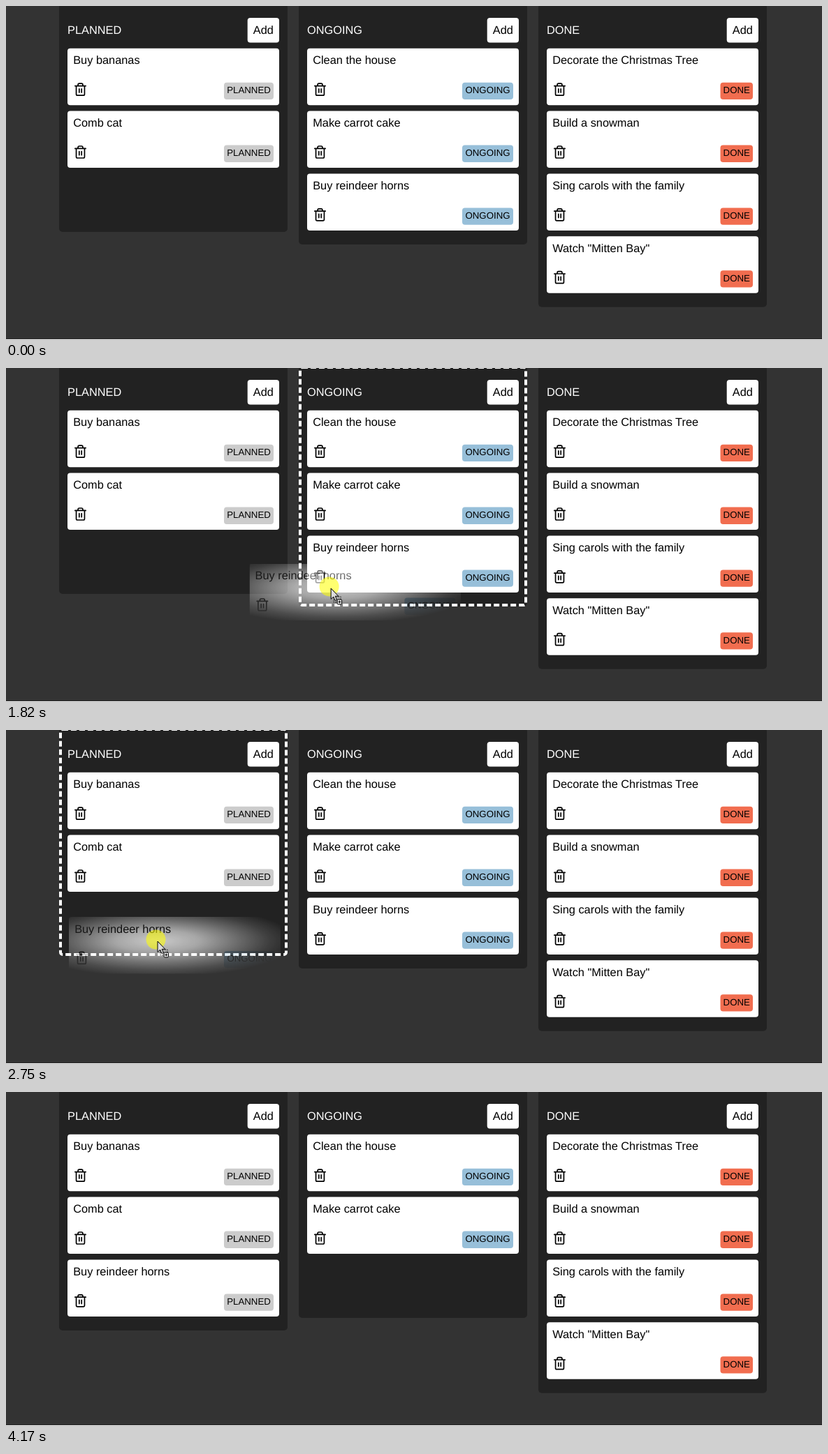
Animation of 1168x479 px, one loop 4.78 s. Source, as an HTML page:

```html
<!DOCTYPE html>
<html lang="en">
<head>
<meta charset="utf-8">
<title>Task board</title>
<style>
  html, body { margin: 0; width: 100%; height: 100%; overflow: hidden; background: #333; }
  svg { display: block; width: 100%; height: 100%; }
  text { font: 16.35px "Liberation Sans", Arial, sans-serif; text-rendering: geometricPrecision; }
  .tag { font-size: 13.28px; }
  .icon { fill: none; stroke: #000; stroke-width: 2; stroke-linecap: round; stroke-linejoin: round; }
</style>
</head>
<body>
<svg id="stage" viewBox="0 0 1168 479">
  <defs>
    <radialGradient id="fade" gradientUnits="userSpaceOnUse" cx="0" cy="0" r="1"
        gradientTransform="translate(127 34.5) scale(200 52)">
      <stop offset="0" stop-color="#fff" stop-opacity=".76"/>
      <stop offset=".3" stop-color="#fff" stop-opacity=".6"/>
      <stop offset=".6" stop-color="#fff" stop-opacity=".31"/>
      <stop offset=".8" stop-color="#fff" stop-opacity=".13"/>
      <stop offset="1" stop-color="#fff" stop-opacity="0"/>
    </radialGradient>
    <mask id="spot" maskUnits="userSpaceOnUse" x="0" y="0" width="303" height="82">
      <rect width="303" height="82" fill="url(#fade)"/>
    </mask>
    <g id="trash" class="icon">
      <path d="M3 6h18M19 6v14a2 2 0 0 1-2 2H7a2 2 0 0 1-2-2V6M8 6V4a2 2 0 0 1 2-2h4a2 2 0 0 1 2 2v2M10 11v6M14 11v6"/>
    </g>
  </defs>
  <rect width="1168" height="479" fill="#333"/>
  <g id="before"></g>
  <g id="after"></g>
  <rect y="478" width="1168" height="1" fill="#fff"/>
  <rect id="drop" y="-1" width="323" rx="3" fill="none" stroke="#fff" stroke-width="4" stroke-dasharray="8 4"/>
  <g id="ghost"><g id="ghostCard" mask="url(#spot)"></g></g>
  <g id="cursor">
    <circle id="press" cx="-2" cy="-2" r="14" fill="#ff0" fill-opacity=".56"/>
    <path id="arrow" d="M.5 .5V16L4 12.7L6.5 18L9 17L6.6 11.8H11.2Z" fill="#fff" stroke="#000"/>
    <g id="copy" fill="none" stroke="#000">
      <path d="M4.500 13.500V20.500H14.500V12.500H9" stroke-dasharray="1.500 1.500"/>
      <rect x="9.500" y="16.500" width="6.500" height="7" rx="1.500" fill="#ddd"/>
      <path d="M11 20h3.600M12.800 18.200v3.600"/>
    </g>
    <path id="move" fill="#fff" stroke="#000" stroke-linejoin="round"
      d="M0-9.500L3.500-6H1.300V-1.300H6V-3.500L9.500 0L6 3.500V1.300H1.300V6H3.500L0 9.500L-3.500 6H-1.300V1.300H-6V3.500L-9.500 0L-6-3.500V-1.300H-1.300V-6H-3.500Z"/>
  </g>
</svg>
<script>
const LOOP = 4780, GRAB = 1350, DROP = 3440;
const $ = id => document.getElementById(id);

const COLUMNS = [
  { name: 'PLANNED', x: 76, color: '#ccc', tag: 71 },
  { name: 'ONGOING', x: 419, color: '#97bfd9', tag: 73 },
  { name: 'DONE', x: 762, color: '#f16d4f', tag: 46.5 }
];
const planned = ['Buy bananas', 'Comb cat'];
const ongoing = ['Clean the house', 'Make carrot cake'];
const done = ['Decorate the Christmas Tree', 'Build a snowman',
  'Sing carols with the family', 'Watch "Mitten Bay"'];
const moving = 'Buy reindeer horns';

const rect = (x, y, w, h, r, fill) =>
  `<rect x="${x}" y="${y}" width="${w}" height="${h}" rx="${r}" fill="${fill}"/>`;
const label = (x, y, str, attrs = '') => `<text x="${x}" y="${y}" ${attrs}>${str}</text>`;

function card(title, col) {
  const left = 295 - col.tag;
  return rect(0, 0, 303, 81.5, 4, '#fff') +
    label(8.2, 22.5, title) +
    '<use href="#trash" transform="translate(8.300 48.700) scale(.85)"/>' +
    rect(left, 49, col.tag, 24.3, 4, col.color) +
    label(left + col.tag / 2, 64.4, col.name, 'class="tag" text-anchor="middle"');
}

const bottomOf = count => Math.max(324, 72.6 + 89.8 * count);

function column(col, titles) {
  const cards = titles.map((title, i) =>
    `<g transform="translate(12 ${60.8 + 89.8 * i})">${card(title, col)}</g>`);
  return `<g transform="translate(${col.x} 0)">` +
    rect(0, -3, 327, bottomOf(titles.length) + 3, 5, '#222') +
    label(12, 39.8, col.name, 'fill="#fff"') +
    rect(269.7, 17, 45.3, 35.5, 4, '#fff') +
    label(292.3, 39.8, 'Add', 'text-anchor="middle"') +
    cards.join('') + '</g>';
}

const board = lists => lists.map((titles, i) => column(COLUMNS[i], titles)).join('');

$('before').innerHTML = board([planned, [...ongoing, moving], done]);
$('after').innerHTML = board([[...planned, moving], ongoing, done]);
$('ghostCard').innerHTML = card(moving, COLUMNS[1]);

// Pointer path: time, x, y
const PATH = [
  [120, 1016, 446], [250, 860, 425], [330, 700, 385], [460, 530, 347], [520, 517, 367],
  [590, 517, 367], [800, 541, 315], [1020, 557, 275], [1349, 557, 275],
  [1350, 553, 279], [1550, 530, 300], [1750, 493, 314.5], [1820, 463, 315.5],
  [1950, 405, 315.5], [2080, 343, 315.5], [2150, 325, 315.5], [2350, 264, 302.5],
  [2600, 219, 302.5], [2750, 216.5, 302.5], [2880, 214, 302.5], [3090, 201, 302.5],
  [3439, 201, 302.5], [3440, 201, 300], [3540, 201, 300], [3820, 600, 405], [4100, 1106, 441]
];
// The pointer is sampled in steps: start, step length
const STEPS = [[0, 120], [120, 66.6], [660, 72], [1350, 66.6], [3440, 170], [3610, 70]];

function snap(t) {
  const [start, step] = STEPS.filter(s => s[0] <= t).pop();
  return start + Math.floor((t - start) / step + 1e-6) * step;
}

function pointer(t) {
  const i = PATH.findIndex(p => p[0] > t);
  if (i === 0) return PATH[0].slice(1);
  if (i < 0) return PATH[PATH.length - 1].slice(1);
  const [t0, x0, y0] = PATH[i - 1], [t1, x1, y1] = PATH[i];
  const k = (t - t0) / (t1 - t0);
  return [x0 + (x1 - x0) * k, y0 + (y1 - y0) * k];
}

const show = (id, on) => $(id).setAttribute('display', on ? 'inline' : 'none');
const place = (id, x, y) => $(id).setAttribute('transform', `translate(${x} ${y})`);

function draw(t) {
  const time = snap(t), [x, y] = pointer(time);
  const dragging = t >= GRAB && t < DROP;
  const hover = t > 600 && t < GRAB && y < 322;

  show('before', t < DROP);
  show('after', t >= DROP);
  show('cursor', t >= 120 && t < 4170);
  show('move', hover);
  show('arrow', !hover);
  show('press', dragging);
  show('copy', dragging);
  show('ghost', dragging);
  place('cursor', x, y);
  $('arrow').setAttribute('fill', dragging ? '#ddd' : '#fff');

  const over = x >= 419 ? 1 : x <= 403 ? 0 : -1;
  show('drop', dragging && over >= 0);
  if (!dragging) return;
  if (over >= 0) {
    $('drop').setAttribute('x', COLUMNS[over].x + 2);
    $('drop').setAttribute('height', bottomOf(over ? 3 : 2) - 1);
  }
  // The dragged card trails the pointer slightly
  const [gx, gy] = pointer(time - 25);
  place('ghost', gx - 127, gy - 34.5);
}

function tick() {
  draw(performance.now() % LOOP);
  requestAnimationFrame(tick);
}
tick();
</script>
</body>
</html>
```
